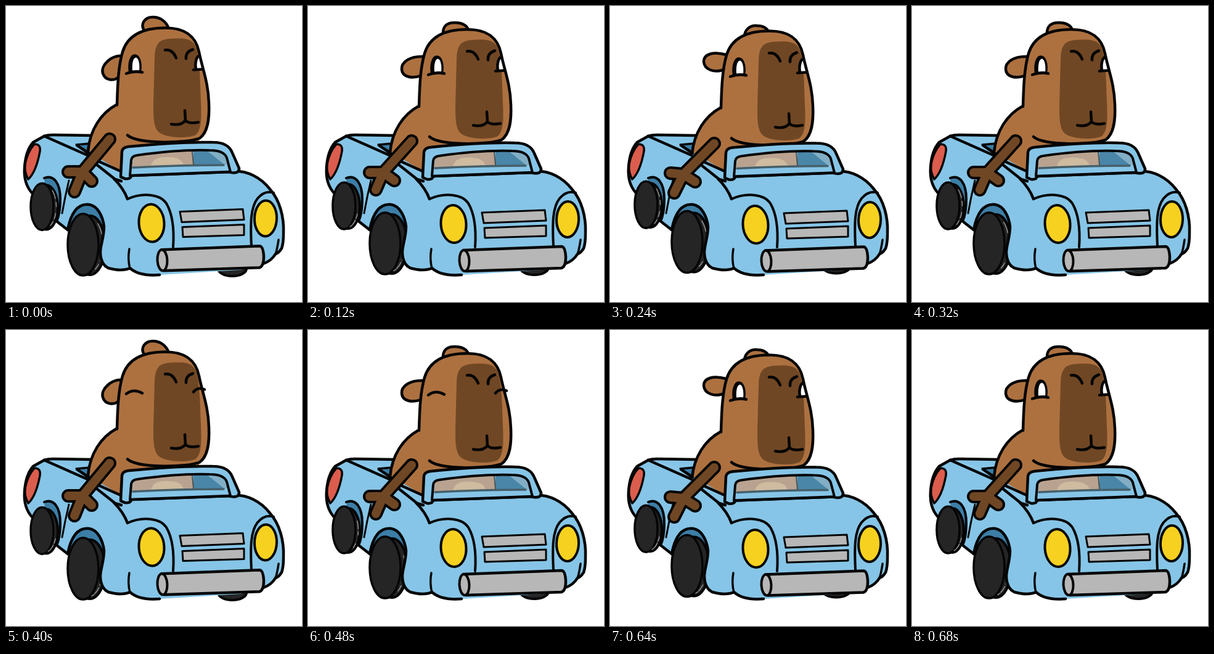
Write an HTML page with a canvas that moves like this. It is 480 by 480 pixels and loops after 800 ms.

```html
<!DOCTYPE html>
<html>
<head>
<meta charset="utf-8">
<style>
html, body { margin: 0; width: 100%; height: 100%; overflow: hidden; background: #fff; }
canvas { display: block; width: 100vmin; height: 100vmin; }
</style>
</head>
<body>
<canvas id="c" width="480" height="480"></canvas>
<script>
const ctx = document.getElementById('c').getContext('2d');
const INK = '#050505', BLUE = '#86c5e7', DEEP = '#3c7ea6', FUR = '#ad7140',
      DARK = '#704724', GREY = '#b7b7b7', TYRE = '#252525', YELLOW = '#f6d11f';

// bounce poses: high, middle, low
const POSES = [
  { head: -2.5, face: -1.5, body: -1.5, wheel: 2,
    back: 'M224 40C217 28 226 18 238 18C250 18 260 25 264 37',
    ear: 'M190 81C170 79 153 97 157 109C161 122 175 121 182 116',
    arm: [[168, 216], [124, 269], [101, 269], [139, 284], [111, 301]] },
  { head: 0, face: .5, body: 0, wheel: 0,
    back: 'M219 46C218 31 227 27 238 27C249 27 258 31 260 39',
    ear: 'M187 82C165 81 151 91 152 103C153 116 170 118 183 113',
    arm: [[168, 219], [122, 270], [100, 270], [140, 283], [110, 298]] },
  { head: 2.5, face: 3.5, body: 1, wheel: -2.5,
    back: 'M218 49C219 36 229 31 239 32C248 32 255 36 257 42',
    ear: 'M188 79C168 73 152 78 152 90C153 104 170 108 182 104',
    arm: [[169, 223], [119, 273], [98, 271], [138, 285], [104, 303]] }
];

// start ms, pose, tread phase, eyes closed
const STEPS = [
  [0, 0, 0, 0], [120, 1, 1, 0], [200, 2, 2, 0], [240, 2, 0, 0], [320, 1, 0, 0],
  [360, 1, 1, 0], [400, 0, 1, 1], [480, 1, 2, 1], [600, 2, 0, 0], [640, 2, 1, 0], [680, 1, 1, 0]
];

// tread highlights as angle ranges in degrees
const MARKS = [
  [[-48, -22], [-12, 0], [18, 34], [44, 60]],
  [[22, 36], [42, 62], [66, 74]],
  [[-24, -2], [4, 14], [40, 56]]
];

const HEAD = 'M180 163C181 130 182 101 189 77C198 47 226 38 258 38C292 38 308 52 313 77' +
  'C318 103 328 125 329 160C330 184 328 207 314 217C294 225 214 227 197 212';
const REAR = 'M42 303C33 293 29 279 30 263C31 245 36 230 44 221L62 211';
const NOSE = 'C392 266 414 279 428 297C444 315 451 342 450 368Q450 385 447 393' +
  'Q442 401 437 402Q431 413 417 418';

function shape(d, fill, line = 4.5, ink = INK) {
  const p = new Path2D(d);
  if (fill) { ctx.fillStyle = fill; ctx.fill(p); }
  if (line) { ctx.lineWidth = line; ctx.strokeStyle = ink; ctx.stroke(p); }
}

function oval(x, y, rx, ry, fill, line = 4, tilt = 0) {
  ctx.beginPath();
  ctx.ellipse(x, y, rx, ry, tilt, 0, 7);
  ctx.fillStyle = fill;
  ctx.fill();
  if (line) { ctx.lineWidth = line; ctx.strokeStyle = INK; ctx.stroke(); }
}

function shifted(dy, draw) {
  ctx.save();
  ctx.translate(0, dy);
  draw();
  ctx.restore();
}

function wheel(x, y, rx, ry, depth, phase) {
  oval(x + depth, y + 1, rx, ry - 2, TYRE);
  oval(x, y, rx, ry, TYRE, 3.5);
  ctx.strokeStyle = '#999';
  ctx.lineWidth = 1.4;
  for (const [a, b] of MARKS[phase]) {
    ctx.beginPath();
    ctx.ellipse(x + depth * .65, y, rx, ry * .92, 0, a * Math.PI / 180, b * Math.PI / 180);
    ctx.stroke();
  }
}

function eyes(closed) {
  if (closed) {
    shape('M195 105Q207 96 221 104');
    shape('M304 102Q311 93 322 98');
    return;
  }
  shape('M201 108C199 94 203 82 209 82C216 82 219 96 217 107Z', INK);
  shape('M205 107C204 95 206 85 211 85C216 87 217 98 216 107Z', '#fff', 0);
  shape('M195 111Q208 106 221 109');
  shape('M309 105C308 93 310 82 314 82L319 104Z', '#fff', 0);
  shape('M308 104C306 93 309 83 314 82M304 105L319 104');
}

function capybara(p, closed) {
  shape(p.back, FUR);
  shape(p.ear, FUR);
  shifted(p.head, () => {
    shape('M180 163C155 178 137 203 133 235L185 280L240 255L312 226L314 217L250 160Z', FUR, 0);
    shape('M180 162C154 176 136 203 133 238');
    shape(HEAD + 'Z', FUR, 0);
  });
  shifted(p.face, () => {
    shape('M247 62C253 54 269 54 281 54C299 54 307 60 310 76C314 92 315 120 316 155' +
      'C317 180 318 203 307 211C291 217 260 215 249 207C239 200 239 181 239 160L241 86Q241 69 247 62Z', DARK, 0);
    eyes(closed);
    shape('M258 73Q270 71 276 86M303 72Q291 76 292 87');
    shape('M290 171L291 187Q284 196 268 193M291 187Q296 193 312 190');
  });
  shifted(p.head, () => shape(HEAD));
}

function arm([top, mid, ...tips]) {
  for (const [w, color] of [[22, INK], [14, DARK]]) {
    ctx.strokeStyle = color;
    ctx.lineWidth = w;
    ctx.beginPath();
    ctx.moveTo(...top);
    ctx.lineTo(...mid);
    for (const t of tips) { ctx.moveTo(...mid); ctx.lineTo(...t); }
    ctx.stroke();
  }
}

function windshield() {
  shape('M186 278L188 237Q189 230 199 229C250 224 300 221 335 222C355 222 363 229 367 239' +
    'L378 264Q378 273 366 271L361 270L203 276Q202 282 193 281Z', BLUE);
  const glass = 'M201 276L203 251Q204 244 213 243C255 237 300 234 330 235C347 235 355 239 358 247L364 270';
  shape(glass + 'Z', BLUE, 0);
  shape('M204 263L206 248Q207 244 214 244C245 239 275 237 302 236L304 258Z', '#b9a390', 0);
  shape('M235 260C238 247 250 245 265 246C280 247 286 251 288 259Z', '#cfbb9f', 0);
  shape('M304 236L328 237L354 258L304 258Z', '#4a86a8', 0);
  shape('M328 237Q352 237 356 248L359 258L354 258Z', '#82aec5', 0);
  shape('M206 263Q280 259 353 259', null, 3.5, '#45606b');
  shape('M302 237L304 258', null, 2, '#4d5352');
  shape(glass, null, 4);
  shape('M203 276Q280 273 363 270');
}

function lights() {
  oval(236, 353.5, 20.5, 30.5, YELLOW, 4, -.06);
  oval(421, 346, 18, 29, YELLOW, 4, .03);
  shape('M282 335L384 331L386 348L285 352Z', GREY, 3);
  shape('M286 360L386 356L386 373L287 376Z', GREY, 3);
}

function shell() {
  shape('M62 211L115 226L187 268L203 274L366 268' + NOSE + 'L380 428L249 436' +
    'C225 438 211 434 201 426L159 424L153 370L99 363L82 349' + REAR.replace('M', 'L') + 'Z', BLUE, 0);
  shape('M46 224Q57 224 55 236C52 252 46 272 36 281Q29 268 31 256Q35 236 46 224Z', '#db5d4d', 3.5);
  shape(REAR);
  shape('M62 211L132 242M148 258L177 281L187 284M115 226L134 239M146 250L186 268');
  shape('M175 280C184 289 192 299 197 313');
  shape('M366 268' + NOSE);
  shape('M82 349L100 363');
  shape('M102 283Q96 308 91 336', null, 3);
  // wheel arches
  shape('M62 279C78 273 88 288 88 313Q88 337 82 349L66 330Z', DEEP, 0);
  shape('M62 279C78 273 88 288 88 313Q88 337 82 349', null, 4);
  shape('M102 352C108 330 120 320 135 322C149 324 156 338 158 360L150 380Z', DEEP, 0);
  shape('M100 363C106 332 118 320 135 322C148 324 157 340 159 358');
}

// bodywork in front of the wheel
function fender() {
  const edge = 'M159 357C159 374 154 385 153 398C153 412 158 421 166 425';
  const hem = 'Q188 431 201 425C211 434 225 438 249 436';
  shape(edge + hem + 'L258 345L197 330Z', BLUE, 0);
  shape(edge + hem);
  shape('M201 426Q197 410 200 394M437 403Q440 393 442 379', null, 3.5);
  shape('M197 313C222 302 250 305 260 320C270 337 273 362 271 391', null, 4);
  shape('M398 389C396 350 397 326 408 312Q420 298 434 303', null, 4);
}

function bumper() {
  shape('M252 396L411 390Q417 390 418 407Q418 423 411 425L256 430Z', GREY);
  oval(253.5, 413, 8, 17, GREY, 4, -.05);
}

function paint(ms) {
  const [, pose, phase, closed] = STEPS.filter(s => s[0] <= ms).pop();
  const p = POSES[pose];
  ctx.fillStyle = '#fff';
  ctx.fillRect(0, 0, 480, 480);
  ctx.lineCap = ctx.lineJoin = 'round';
  oval(367, 424 + p.wheel, 23, 12, TYRE);
  shape('M62 211Q68 209 76 209L140 210L188 260L188 274L115 226Z', BLUE, 0);
  shape('M62 211Q68 209 76 209L140 210');
  shape('M114 225L136 223L150 248Z', DEEP, 3.5);
  capybara(p, closed);
  shell();
  shifted(p.body * .6, windshield);
  shifted(p.wheel * .7, () => wheel(58.5, 324, 18.5, 38, 7, phase));
  shifted(p.wheel, () => wheel(125, 385, 25, 50, 11, phase));
  fender();
  shifted(p.body, lights);
  shifted(p.body * .5, bumper);
  arm(p.arm);
}

function tick() {
  paint(performance.now() % 800);
  requestAnimationFrame(tick);
}
tick();
</script>
</body>
</html>
```
